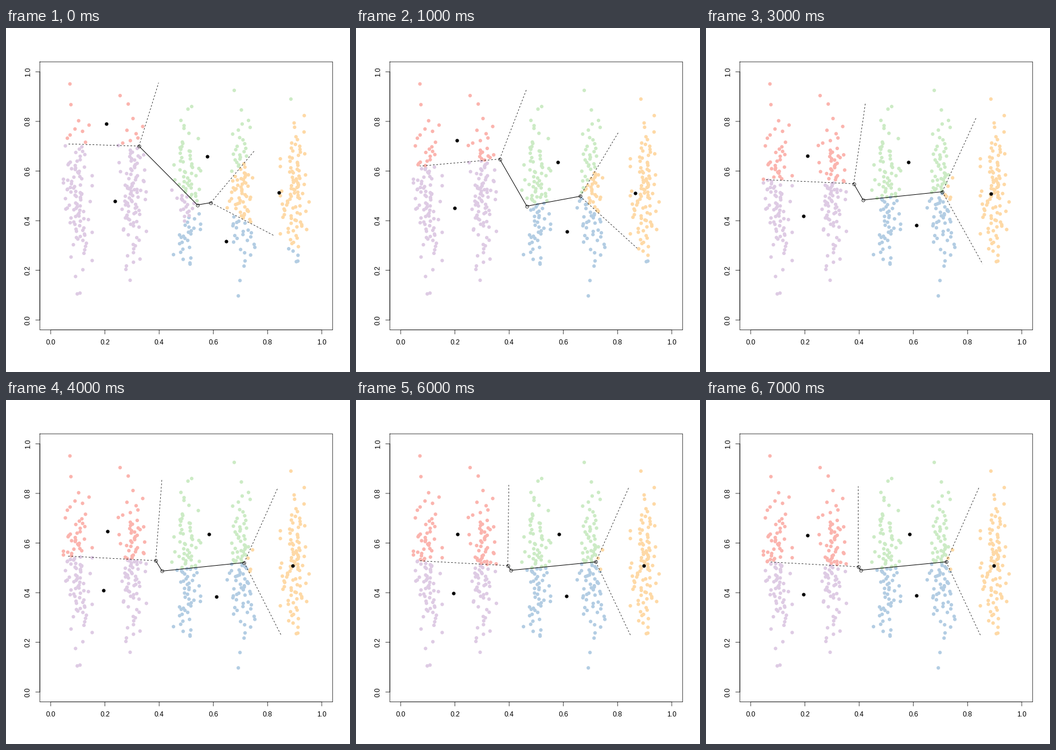
Animation, 600 px wide and 600 px high, one loop 8 s. Source, as a matplotlib script:

```python
import numpy as np
import matplotlib.pyplot as plt
from matplotlib.animation import FuncAnimation

SIZE, DPI = 600, 100
PX = 72 / DPI                               # points per pixel
THIN = 0.75 * PX
ORIGIN = np.array([77.96, 509.24])          # stage position of data (0, 0)
SCALE = np.array([472.89, -432.89])
LEFT, TOP, RIGHT, BOTTOM = 59.04, 59.04, 569.76, 526.56
TICK = 7.2

RED, PURPLE, GREEN, BLUE, ORANGE = range(5)
COLOURS = np.array(["#FBB4AE", "#DECBE4", "#CCEBC5", "#B3CDE3", "#FED9A6"])

# Cluster centres: random seeds, the means after one step, and where they settle.
SEEDS = np.array([(.184, .946), (.168, .465), (.575, .835), (.704, .128), (.945, .551)])
FIRST = np.array([(.206, .790), (.236, .479), (.578, .659), (.647, .318), (.842, .514)])
FINAL = np.array([(.209, .628), (.195, .386), (.587, .635), (.611, .388), (.898, .509)])
# Share of the remaining distance kept at each step.
KEEP = np.array([(.5, .59), (.1, .7), (.8, .05), (.05, .46), (.58, .5)])

# Lowest and highest point of each column.
ENDS = [((.098, .105), (.071, .951)), ((.293, .160), (.256, .904)),
        ((.514, .225), (.520, .860)), ((.692, .097), (.677, .925)),
        ((.906, .235), (.886, .890))]


def centres(step):
    if step == 0:
        return SEEDS
    return FINAL + (FIRST - FINAL) * KEEP ** (step - 1)


def make_points(count=100, oversample=8):
    rng = np.random.default_rng(5)
    parts = []
    for i, (low, high) in enumerate(ENDS):
        # Every eighth of a sorted sample gives an even bell curve.
        y = np.sort(rng.normal(0.5, 0.15, count * oversample))
        y = y[oversample // 2::oversample]
        y = y[(y > low[1]) & (y < high[1])]
        x = 0.1 + 0.2 * i + rng.normal(0, 0.024, y.size).clip(-0.053, 0.053)
        parts += [np.column_stack([x, y]), [low, high]]
    return np.vstack(parts)


def to_stage(p):
    return p * SCALE + ORIGIN


def circumcentre(a, b, c):
    m = 2 * np.array([b - a, c - a])
    return np.linalg.solve(m, [b @ b - a @ a, c @ c - a @ a])


def ray_end(node, a, b, other, length):
    """End of the open edge between a and b, pointing away from other."""
    d = np.array([a[1] - b[1], b[0] - a[0]])
    if d @ ((a + b) / 2 - other) < 0:
        d = -d
    return node + length * d / np.hypot(*d)


def mosaic(c):
    """Inner nodes and the open edges, in stage pixels."""
    nodes = np.array([circumcentre(*c[[RED, PURPLE, GREEN]]),
                      circumcentre(*c[[PURPLE, GREEN, BLUE]]),
                      circumcentre(*c[[GREEN, BLUE, ORANGE]])])
    length = np.ptp(nodes[:, 0])
    edges = [(0, RED, PURPLE, GREEN), (0, RED, GREEN, PURPLE),
             (2, GREEN, ORANGE, BLUE), (2, BLUE, ORANGE, GREEN)]
    rays = [(nodes[n], ray_end(nodes[n], c[i], c[j], c[k], length))
            for n, i, j, k in edges]
    return to_stage(nodes), to_stage(np.array(rays))


fig = plt.figure(figsize=(SIZE / DPI, SIZE / DPI), dpi=DPI, facecolor="white")
ax = fig.add_axes([0, 0, 1, 1])
ax.set_xlim(0, SIZE)
ax.set_ylim(SIZE, 0)
ax.axis("off")


def stroke(xs=(), ys=(), **style):
    style = dict(color="black", lw=THIN, snap=False, zorder=4) | style
    return ax.plot(xs, ys, **style)[0]


def markers(diameter, z, **style):
    return ax.plot([], [], "o", ms=diameter * PX, zorder=z, **style)[0]


def label(x, y, value, angle=0):
    ax.text(x, y, f"{value:.1f}", rotation=angle, rotation_mode="anchor",
            ha="center", va="baseline", family="Liberation Sans",
            fontsize=12 * PX, color="black")


stroke([LEFT, RIGHT, RIGHT, LEFT, LEFT], [TOP, TOP, BOTTOM, BOTTOM, TOP])
(x0, y0), (x1, y1) = to_stage(np.array([(0, 0), (1, 1)]))
stroke([x0, x1], [BOTTOM, BOTTOM], solid_capstyle="butt")
stroke([LEFT, LEFT], [y0, y1], solid_capstyle="butt")
for v in np.arange(6) / 5:
    x, y = to_stage(np.array([v, v]))
    stroke([x, x], [BOTTOM, BOTTOM + TICK])
    stroke([LEFT, LEFT - TICK], [y, y])
    label(x, 552.2, v)
    label(41.8, y, v, 90)

points = make_points()
dots = ax.scatter(*to_stage(points).T, s=(6.2 * PX) ** 2, linewidths=0, zorder=3)
path = stroke(lw=PX)
rays = [stroke(ls=(0, (4, 4)), dash_capstyle="butt") for _ in range(4)]
rings = markers(5.4, 5, mfc="none", mec="black", mew=THIN)
means = markers(6.2, 6, mfc="black", mew=0)


def draw(step):
    # Cells come from the previous centres; the black dots are the new ones.
    seeds = centres(step)
    gaps = points[:, None] - seeds
    dots.set_facecolor(COLOURS[(gaps ** 2).sum(axis=2).argmin(axis=1)])
    nodes, ends = mosaic(seeds)
    path.set_data(*nodes.T)
    rings.set_data(*nodes.T)
    for ray, end in zip(rays, ends):
        ray.set_data(*end.T)
    means.set_data(*to_stage(centres(step + 1)).T)
    return [dots, path, rings, means, *rays]


anim = FuncAnimation(fig, draw, frames=8, interval=1000, repeat=True,
                     repeat_delay=0, init_func=lambda: draw(0))
plt.show()
```
